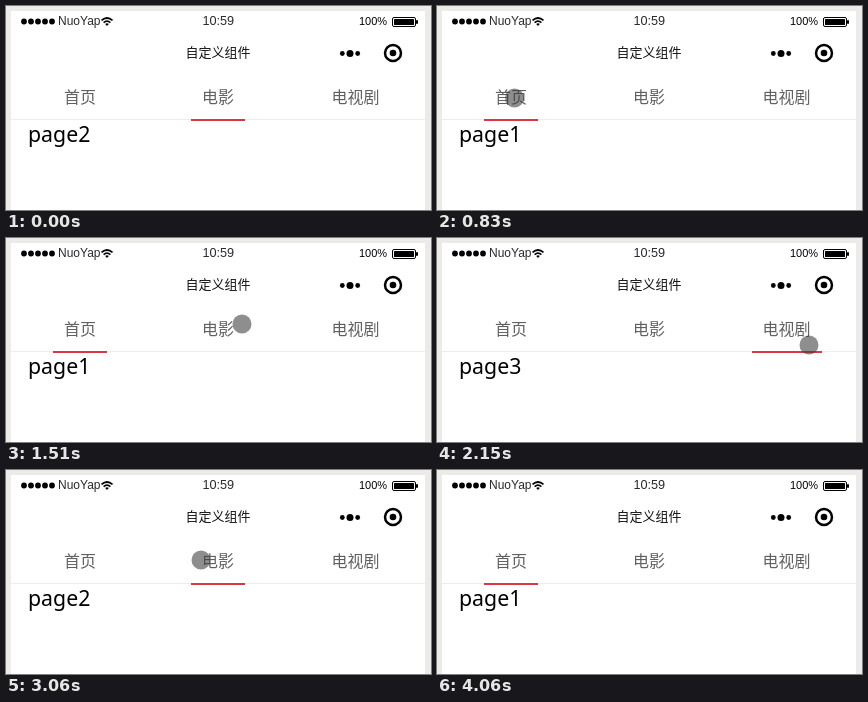
Animation of 425 by 204 pixels, one loop 4540 ms. Source, as an HTML page:

```html
<!DOCTYPE html>
<html lang="zh">
<head>
<meta charset="utf-8">
<title>自定义组件</title>
<style>
  html, body { margin: 0; width: 100%; height: 100%; overflow: hidden; background: #ecebe7; }
  svg { display: block; width: 425px; height: 204px; }
  .status { font: 12px "Liberation Sans", Arial, sans-serif; fill: #2a2a2a; }
  .time { font-size: 12.7px; text-anchor: middle; }
  .charge { font-size: 11px; fill: #000; }
  .cjk { font-family: "Noto Sans CJK SC", "Noto Sans CJK", sans-serif; text-anchor: middle; }
  .title { font-size: 13px; fill: #111; }
  .tab { font-size: 16px; fill: #606060; }
  .page { font: 21.3px "Noto Sans", sans-serif; fill: #000; }
  .line { fill: none; stroke: #000; }
</style>
</head>
<body>
<svg viewBox="0 0 425 204">
  <rect width="425" height="204" fill="#ecebe7"/>
  <rect x="5" y="5" width="414" height="199" fill="#fff"/>

  <path d="M18 15.5h28.2" class="line" stroke-width="5.8" stroke-linecap="round" stroke-dasharray="0 7"/>
  <text x="52" y="19" class="status">NuoYap</text>
  <g class="line" stroke-width="1.7">
    <path d="M95.5 14.3q5.5-4.6 11 0"/>
    <path d="M97.6 16.6q3.4-2.8 6.8 0"/>
  </g>
  <path d="M99.2 18q1.8-1.3 3.6 0l-1.8 2z"/>
  <text x="212.3" y="19" class="status time">10:59</text>
  <text x="353" y="19" class="status charge">100%</text>
  <rect x="386.5" y="11.5" width="23" height="9" rx="1.5" class="line"/>
  <rect x="388" y="13" width="20" height="6" rx=".5"/>
  <rect x="410" y="14" width="2" height="4" rx="1"/>

  <text x="212" y="51" class="cjk title">自定义组件</text>
  <circle cx="336.3" cy="47.5" r="2.4"/>
  <circle cx="344" cy="47.5" r="3.5"/>
  <circle cx="351.7" cy="47.5" r="2.4"/>
  <circle cx="387" cy="47" r="8" class="line" stroke-width="2.5"/>
  <circle cx="387" cy="47" r="3.3"/>

  <text x="74" y="97" class="cjk tab">首页</text>
  <text x="212" y="97" class="cjk tab">电影</text>
  <text x="349.5" y="97" class="cjk tab">电视剧</text>
  <rect x="5" y="113" width="414" height="1" fill="#ececec"/>
  <rect id="mark" y="113" height="2" fill="#da3742"/>
  <text id="page" x="22" y="136" class="page">page2</text>
  <circle id="touch" r="9.5" fill="#3c3c3c" fill-opacity=".58"/>
</svg>
<script>
const LOOP = 4540, START = 270, STEP = 77; // ms; the pointer moves once per STEP
const [mark, page, touch] = ["mark", "page", "touch"].map(id => document.getElementById(id));

// Pointer route: step, x, y and the tab tapped there, if any
const route = [
  [0, 130, 178],
  [7, 77.5, 92, 0],
  [13, 233, 88],
  [16, 236, 86],
  [18, 258, 84, 1],
  [20, 344, 86],
  [24, 372, 107, 2],
  [27, 410, 172],
  [30, 125, 147],
  [32, 138.5, 117.5],
  [36, 195, 90, 1],
  [39, 16, 107],
  [41, 74.5, 95.5],
  [44, 78, 92, 0],
  [48, 347, 192]
];
const lastStep = route[route.length - 1][0];
const ease = u => u * u * (3 - 2 * u);

function showTab(tab) {
  const width = tab === 2 ? 70 : 54;
  mark.setAttribute("x", 74 + 138 * tab - width / 2);
  mark.setAttribute("width", width);
  page.textContent = "page" + (tab + 1);
}

function draw(t) {
  const step = Math.floor((t - START) / STEP);
  const tap = route.filter(stop => stop[0] <= step && stop.length > 3).pop();
  showTab(tap ? tap[3] : 1);

  const shown = step >= 0 && step <= lastStep;
  touch.setAttribute("visibility", shown ? "visible" : "hidden");
  if (!shown) return;
  const next = Math.max(1, route.findIndex(stop => stop[0] >= step));
  const [a, b] = [route[next - 1], route[next]];
  const u = ease((step - a[0]) / (b[0] - a[0]));
  touch.setAttribute("cx", a[1] + (b[1] - a[1]) * u);
  touch.setAttribute("cy", a[2] + (b[2] - a[2]) * u);
}

const begin = performance.now();
function tick() {
  draw((performance.now() - begin) % LOOP);
  requestAnimationFrame(tick);
}
tick();
</script>
</body>
</html>
```
